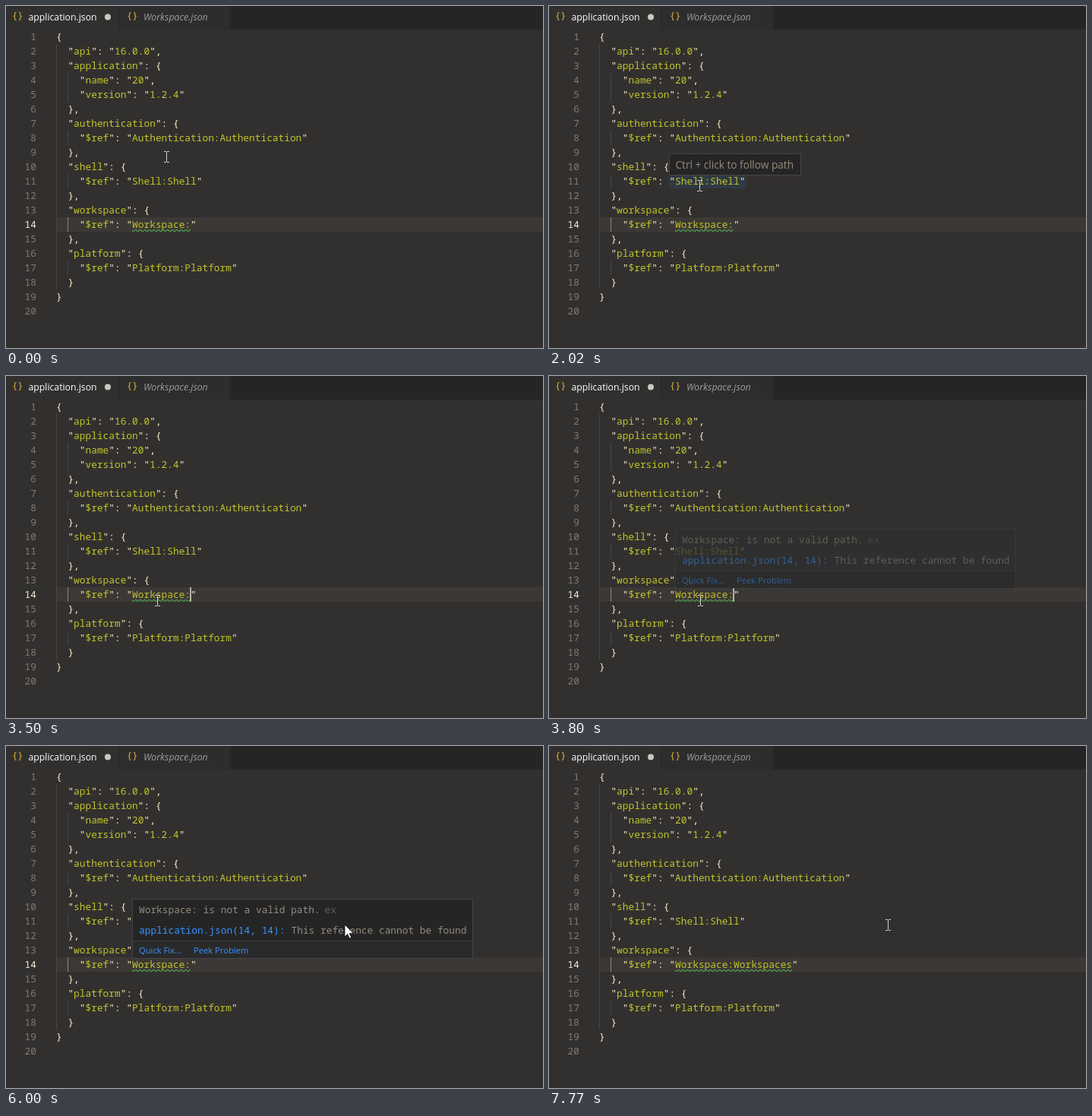
These frames come from a looping animation (707 by 450 pixels, 8000 ms). An HTML page with a canvas:

```html
<!DOCTYPE html>
<html lang="en">
<head>
<meta charset="utf-8">
<title>Editor path checks</title>
<style>
html, body { margin: 0; width: 100%; height: 100%; overflow: hidden; background: #32302f; }
canvas { display: block; }
</style>
</head>
<body>
<canvas id="stage" width="707" height="450"></canvas>
<script>
const ctx = document.getElementById('stage').getContext('2d');
const LOOP = 8000, TICK = 70, CHAR = 7.7, LINE = 19, LEFT = 66, TOP = 31;
const MONO = '500 12.83px "Noto Sans Mono", monospace';
const ui = (size, style = '') => `${style} ${size}px "Open Sans", sans-serif`;
const BACK = '#32302f', GREEN = '#c2c52a', PALE = '#fbf1c7';
const MUTED = '#968b7c', BLUE = '#3794ff', GUIDE = '#484542';

const code = `{
  "api": "16.0.0",
  "application": {
    "name": "20",
    "version": "1.2.4"
  },
  "authentication": {
    "$ref": "Authentication:Authentication"
  },
  "shell": {
    "$ref": "Shell:Shell"
  },
  "workspace": {
    "$ref": "Workspace:"
  },
  "platform": {
    "$ref": "Platform:Platform"
  }
}
`.split('\n');

const word = 'Workspaces';
const TYPE_START = 6140, KEY_GAP = 112, TYPE_END = 7220;
const BLINK_START = 530, BLINK = 495;

const moves = [
  { at: 130, ticks: 3, x: 215, y: 199 },
  { at: 850, ticks: 3, x: 198, y: 236 },
  { at: 2420, ticks: 11, x: 199, y: 298 },
  { at: 3440, ticks: 1, x: 199, y: 295 },
  { at: 4920, ticks: 3, x: 440, y: 222 },
  { at: 5300, ticks: 1, x: 446, y: 235 }
];

function rect(x, y, w, h, color) {
  ctx.fillStyle = color;
  ctx.fillRect(x, y, w, h);
}

function text(str, x, y, color, font = MONO, align = 'left') {
  ctx.font = font;
  ctx.fillStyle = color;
  ctx.textAlign = align;
  ctx.fillText(str, x, y);
}

function panel(x, y, w, h) {
  rect(x, y, w, h, '#454545');
  rect(x + 1, y + 1, w - 2, h - 2, '#252526');
}

function drawTabs() {
  rect(0, 0, 707, TOP, '#252526');
  rect(0, 0, 148, TOP, BACK);
  rect(149, 0, 146, TOP, '#2d2d2d');
  for (const x of [8, 159]) text('{}', x, 17, '#e3b53c', '12px "Noto Sans Mono", monospace');
  text('application.json', 29.5, 19, '#fff', ui(12.25));
  text('Workspace.json', 181, 19, '#9c9c9a', ui(12.35, 'italic'));
  ctx.fillStyle = '#c8c8c4';
  ctx.beginPath();
  ctx.arc(134, 14.5, 4, 0, 7);
  ctx.fill();
}

function drawCode(typed) {
  rect(LEFT, TOP + 13 * LINE, 707 - LEFT, LINE, '#3c3836');
  rect(LEFT, TOP + LINE, 1, 17 * LINE, GUIDE);
  code.forEach((line, i) => {
    const y = TOP + i * LINE, active = i === 13;
    if (line.startsWith('    ')) rect(81, y, 1, LINE, active ? '#8f877a' : GUIDE);
    text(i + 1, 40, y + 14, active ? '#f4eed8' : '#85796f', MONO, 'right');
    if (active) line = line.replace(':"', ':' + typed + '"');
    let col = 0;
    line.split('"').forEach((part, k) => {
      if (k) text('"', LEFT + col++ * CHAR, y + 14, PALE);
      text(part, LEFT + col * CHAR, y + 14, k % 2 ? GREEN : PALE);
      col += part.length;
    });
  });
}

function drawSquiggle(chars) {
  ctx.save();
  ctx.beginPath();
  ctx.rect(166, 294, chars * CHAR, 3);
  ctx.clip();
  ctx.beginPath();
  for (let i = 0; i < chars * 3; i++) ctx.lineTo(164.75 + i * 3, i % 2 ? 297 : 294);
  ctx.strokeStyle = '#4d9e4d';
  ctx.lineWidth = 1.1;
  ctx.stroke();
  ctx.restore();
}

function drawLinkHint() {
  panel(158, 194, 174, 29);
  text('Ctrl + click to follow path', 166.5, 214, MUTED, ui(13.65));
}

function drawProblem() {
  panel(166, 201, 449, 79);
  rect(167, 256, 447, 1, '#3a3a3a');
  rect(167, 257, 447, 22, '#2a2a2a');
  text('Workspace: is not a valid path.', 175, 220, MUTED);
  text('ex', 419.5, 220, '#625d53');
  text('application.json(14, 14):', 175, 247, BLUE);
  text('This reference cannot be found', 375.5, 247, MUTED);
  text('Quick Fix…', 175, 273, BLUE, ui(11.2));
  text('Peek Problem', 247, 273, BLUE, ui(11.2));
}

function pointerAt(t) {
  let x = 211, y = 198;
  for (const m of moves) {
    if (t < m.at) break;
    const u = Math.min(1, (Math.floor((t - m.at) / TICK) + 1) / m.ticks);
    const ease = u * u * (3 - 2 * u);
    x += Math.round((m.x - x) * ease);
    y += Math.round((m.y - y) * ease);
  }
  return [x, y];
}

function drawBeam(x, y) {
  const color = '#d4d3d0';
  rect(x, y - 6, 1, 13, color);
  for (const edge of [y - 7, y + 7]) {
    rect(x - 3, edge, 3, 1, color);
    rect(x + 1, edge, 3, 1, color);
  }
}

function drawArrow(x, y) {
  const shape = new Path2D(`M${x} ${y}v16l3.7-3.4 2.5 5.4 2.4-1-2.4-5.4h5.1z`);
  ctx.fillStyle = '#fff';
  ctx.fill(shape);
  ctx.strokeStyle = '#111';
  ctx.lineWidth = 0.8;
  ctx.stroke(shape);
}

function caretOn(t) {
  if (t >= TYPE_START) return t < TYPE_END + 550;
  return t >= BLINK_START && Math.floor((t - BLINK_START) / BLINK) % 2 === 0;
}

// Shows a popup half faded for its first tick
function popup(t, start, end, draw) {
  if (t < start || t >= end) return;
  ctx.globalAlpha = t < start + TICK ? 0.5 : 1;
  draw();
  ctx.globalAlpha = 1;
}

function draw(t) {
  const typed = word.slice(0, Math.max(0, Math.floor((t - TYPE_START) / KEY_GAP) + 1));
  rect(0, 0, 707, 450, BACK);
  drawTabs();
  popup(t, 1400, 2570, () => rect(158, 221, 101, LINE, '#2f3a43'));
  drawCode(typed);
  if (t < TYPE_END + TICK) drawSquiggle(10);
  else if (t >= TYPE_END + 320) drawSquiggle(20);
  if (caretOn(t)) rect(Math.floor(165 + (10 + typed.length) * CHAR), 278, 2, LINE, '#b5b2a4');
  popup(t, 1400, 2570, drawLinkHint);
  popup(t, 3800, TYPE_START, drawProblem);
  (t >= 4990 && t < TYPE_START ? drawArrow : drawBeam)(...pointerAt(t));
}

const start = performance.now();
function frame(now) {
  draw(Math.max(0, now - start) % LOOP);
  requestAnimationFrame(frame);
}
draw(0);
requestAnimationFrame(frame);
</script>
</body>
</html>
```
